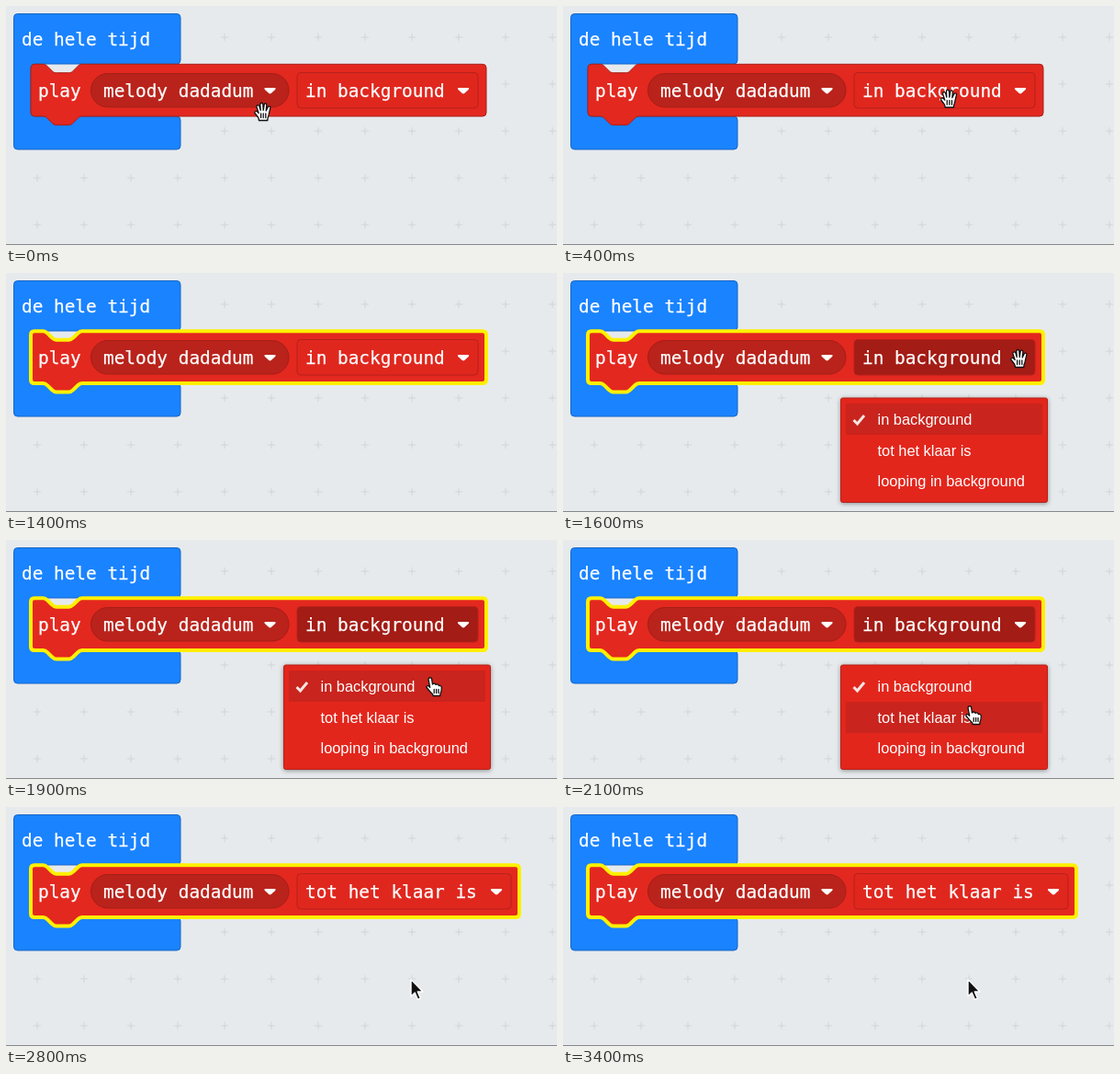
These frames come from a looping animation (600x260 px, 3.5 s). An HTML page:

```html
<!DOCTYPE html>
<html lang="nl">
<head>
<meta charset="utf-8">
<title>Block menu</title>
<style>
html, body { margin: 0; width: 100%; height: 100%; overflow: hidden; background: #e6eaed; }
svg { display: block; width: 600px; height: 260px; }
.code { font: 19.4px "DejaVu Sans Mono", monospace; fill: #fff; stroke: #fff; stroke-width: .25; }
.item { font: 16.4px "Liberation Sans", Arial, sans-serif; fill: #fff; }
.cursor path { stroke-linejoin: round; stroke-linecap: round; }
.hand path { fill: #fff; stroke: #111; stroke-width: 1.3; }
</style>
</head>
<body>
<svg viewBox="0 0 600 260">
  <defs>
    <pattern id="grid" x="8.5" y="8.5" width="51" height="51" patternUnits="userSpaceOnUse">
      <path d="M21.5 25.5h8M25.5 21.5v8" stroke="#d0d4d7"/>
    </pattern>
    <filter id="shadow" x="-10%" y="-10%" width="120%" height="125%">
      <feDropShadow dx="0" dy="1" stdDeviation="2.5" flood-opacity=".4"/>
    </filter>
    <path id="tip" d="M-5 -2.6H5Q7 -2.2 5.6 -.6L1.2 3.5Q0 4.4 -1.2 3.5L-5.6 -.6Q-7 -2.2 -5 -2.6Z" fill="#fff"/>
  </defs>

  <rect width="600" height="260" fill="#e6eaed"/>
  <rect width="600" height="260" fill="url(#grid)"/>
  <path d="M0 259.5H600" stroke="#85888a"/>

  <path fill="#1a83ff" stroke="#1766c6" d="M12.5 8.5H186q4 0 4 4V59q0 4 -4 4H31q-4 0 -4 4V116q0 4 4 4H186q4 0 4 4V152q0 4 -4 4H12.5q-4 0 -4 -4V12.5q0 -4 4 -4Z"/>
  <text class="code" x="17" y="43">de hele tijd</text>

  <path id="block" fill="#e3281f"/>
  <text class="code" x="35" y="99">play</text>
  <rect x="92.5" y="73.5" width="215.5" height="36.5" rx="18.25" fill="#b9231b" stroke="#a31e17"/>
  <text class="code" x="106" y="99">melody dadadum</text>
  <use href="#tip" x="287.5" y="91.5"/>
  <rect id="field" x="317" y="72.5" height="38.5" rx="4" stroke="#b5211a"/>
  <text id="choice" class="code" x="326" y="99"></text>
  <use id="fieldTip" href="#tip" y="91.5"/>

  <g id="menu">
    <rect x="302.5" y="136" width="225" height="113.5" rx="2" fill="#e3281f" stroke="#b5211a" filter="url(#shadow)"/>
    <rect id="hover" x="308" width="214" height="34" fill="#c9241d"/>
    <path d="M316.5 160L320.5 164L328 155" fill="none" stroke="#f3e4e2" stroke-width="3"/>
    <text class="item" x="342.5" y="164.5">in background</text>
    <text class="item" x="342.5" y="198.5">tot het klaar is</text>
    <text class="item" x="342.5" y="232">looping in background</text>
  </g>

  <g id="grab" class="cursor hand">
    <path d="M-4.5 9.5L-5 7C-6 5 -7.5 3.5 -9 1.5C-9.8 -.4 -7.4 -1.6 -6 .3L-4.8 1.6L-7 -5C-7.5 -7.2 -4.8 -8 -4 -5.8L-2.8 -1.5L-3.2 -8C-3.1 -10 -.4 -10 -.2 -8L.2 -1.5L1.2 -7.8C1.6 -9.7 4 -9.2 3.8 -7.2L3.2 -1L5.2 -5C6.2 -6.8 8.5 -5.6 7.8 -3.8L6.4 2C6.2 4 5.8 5 5 7L4.8 9.5Z"/>
    <path d="M-2.4 2V6.5M.2 2V6.5M2.8 2V6.5"/>
  </g>
  <g id="point" class="cursor hand">
    <path d="M-2 1.5C-2 -.8 1.4 -.8 1.6 1.2L2.4 7C3 5.6 5.6 5.6 6 7.4C7 6.4 9 6.8 9.4 8.6C10.6 8 12.4 8.8 12.3 10.8C12.4 14 12 15 11 17L10.8 19.5H3L2.8 18C0 15.5 -2 13 -4 10.5C-4.8 8.8 -2.5 7.8 -1 9.5L-.3 10.3Z"/>
    <path d="M4.2 12.5V16.5M6.6 12.5V16.5M9 12.5V16.5"/>
  </g>
  <g id="arrow" class="cursor">
    <path d="M0 0V18.5L4.2 14.6L7.4 22L10.4 20.7L7.3 13.5H13Z" fill="#111" stroke="#fff" stroke-width="1.4"/>
  </g>
</svg>
<script>
const LOOP = 3500, STEP = 100;
const SELECT = 600, HIDE = 1300, OPEN = 1500, PICK = 2800;
// Time, x and y of the cursor's hot spot
const path = [
  [0, 280, 115], [100, 280, 115], [600, 497, 93], [1600, 497, 93],
  [2100, 443, 181], [2600, 439, 190], [2700, 439, 190], [PICK, 441, 187.5]
];
const $ = id => document.getElementById(id);
const show = (id, on) => $(id).setAttribute("display", on ? "inline" : "none");
const set = (id, attrs) => {
  for (const key in attrs) $(id).setAttribute(key, attrs[key]);
};

function cursorAt(t) {
  const i = path.findIndex(p => p[0] > t);
  if (i < 0) return path[path.length - 1].slice(1);
  const [t0, x0, y0] = path[i - 1], [t1, x1, y1] = path[i];
  const u = (t - t0) / (t1 - t0), k = u * u * (3 - 2 * u);
  return [x0 + (x1 - x0) * k, y0 + (y1 - y0) * k];
}

function blockPath(right) {
  const notch = "c2.3 0 3.5 1.2 4.7 2.4l4.7 4.6c1.2 1.2 2.3 2.4 4.7 2.4h14c2.4 0 3.5 -1.2 4.7 -2.4l4.7 -4.6c1.2 -1.2 2.3 -2.4 4.7 -2.4";
  const back = "c-2.4 0 -3.5 1.2 -4.7 2.4l-4.7 4.6c-1.2 1.2 -2.3 2.4 -4.7 2.4h-14c-2.4 0 -3.5 -1.2 -4.7 -2.4l-4.7 -4.6c-1.2 -1.2 -2.4 -2.4 -4.7 -2.4";
  return `M31 63.3H40.5${notch}H${right - 4}q4 0 4 4V116q0 4 -4 4H82.7${back}H31q-4 0 -4 -4V67.3q0 -4 4 -4Z`;
}

function draw(t) {
  const picked = t >= PICK, open = t >= OPEN && !picked, selected = t >= SELECT;
  const [x, y] = cursorAt(t);
  const grow = picked ? 36 : 0;

  set("block", {
    d: blockPath(523 + grow),
    stroke: selected ? "#fff000" : "#aa1f18",
    "stroke-width": selected ? 4 : 1
  });
  set("field", { width: 197 + grow, fill: open ? "#a31c15" : "#e0271e" });
  set("fieldTip", { x: 498 + grow });
  $("choice").textContent = picked ? "tot het klaar is" : "in background";

  show("menu", open);
  const row = Math.max(0, Math.min(2, Math.floor((y - 142) / 34)));
  set("hover", { y: 142 + row * 34 });

  const kind = picked || (y > 122 && y < 136) ? "arrow" : y >= 136 ? "point" : "grab";
  const hidden = t >= HIDE && t < OPEN;
  for (const id of ["grab", "point", "arrow"]) {
    show(id, id === kind && !hidden);
    set(id, { transform: `translate(${x} ${y})` });
  }
}

const start = performance.now();
function tick() {
  const t = (performance.now() - start) % LOOP;
  draw(Math.floor(t / STEP) * STEP);
  requestAnimationFrame(tick);
}
tick();
</script>
</body>
</html>
```
